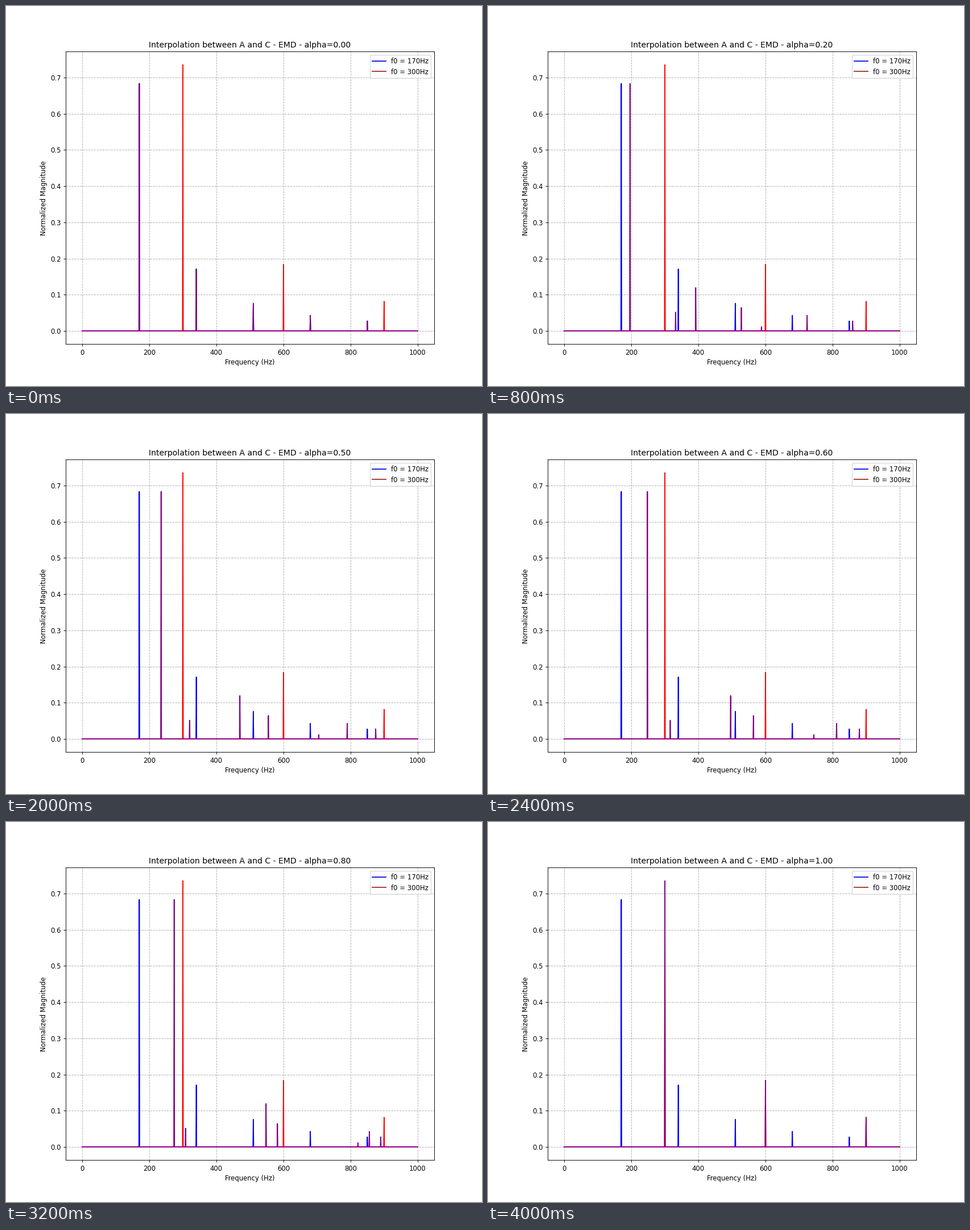
Animation of 837 by 669 pixels, one loop 4.1 s. Source, as a matplotlib script:

```python
import numpy as np
import matplotlib.pyplot as plt
from matplotlib.animation import FuncAnimation

WIDTH, HEIGHT = 837, 669
DPI = 83.7
FRAMES = 41
INTERVAL = 100
MAX_FREQ = 1000
EPS = 1e-6  # keeps the pixel size from being truncated downwards

freqs = np.arange(MAX_FREQ + 1)
alphas = np.linspace(0, 1, FRAMES)


def harmonics(f0):
    """Harmonic frequencies below the limit and their normalized 1/k^2 weights."""
    k = np.arange(1, (MAX_FREQ - 1) // f0 + 1)
    weights = 1 / k**2
    return k * f0, weights / weights.sum()


def spectrum(positions, weights):
    bins = np.round(positions).astype(int)
    return np.bincount(bins, weights, minlength=len(freqs))


def transport_plan(src, dst):
    """Optimal 1D transport as (start, end, mass) moves."""
    (xs, ws), (xd, wd) = src, dst
    ws, wd = ws.copy(), wd.copy()
    moves, i, j = [], 0, 0
    while i < len(xs) and j < len(xd):
        mass = min(ws[i], wd[j])
        if mass > 1e-9:
            moves.append((xs[i], xd[j], mass))
        ws[i] -= mass
        wd[j] -= mass
        if ws[i] <= 1e-9:
            i += 1
        else:
            j += 1
    return np.array(moves).T


low, high = harmonics(170), harmonics(300)
start, end, mass = transport_plan(low, high)

fig, ax = plt.subplots(figsize=(WIDTH / DPI + EPS, HEIGHT / DPI + EPS), dpi=DPI)
ax.plot(freqs, spectrum(*low), color="blue", label="f0 = 170Hz")
ax.plot(freqs, spectrum(*high), color="red", label="f0 = 300Hz")
blend, = ax.plot(freqs, spectrum(start, mass), color="purple")
ax.set_xlabel("Frequency (Hz)")
ax.set_ylabel("Normalized Magnitude")
ax.grid(True, linestyle="--")
ax.legend(loc="upper right")
title = ax.set_title("")


def update(i):
    alpha = alphas[i]
    blend.set_ydata(spectrum((1 - alpha) * start + alpha * end, mass))
    title.set_text(f"Interpolation between A and C - EMD - alpha={alpha:.2f}")
    return blend, title


anim = FuncAnimation(fig, update, frames=FRAMES, interval=INTERVAL, repeat=True)
plt.show()
```
